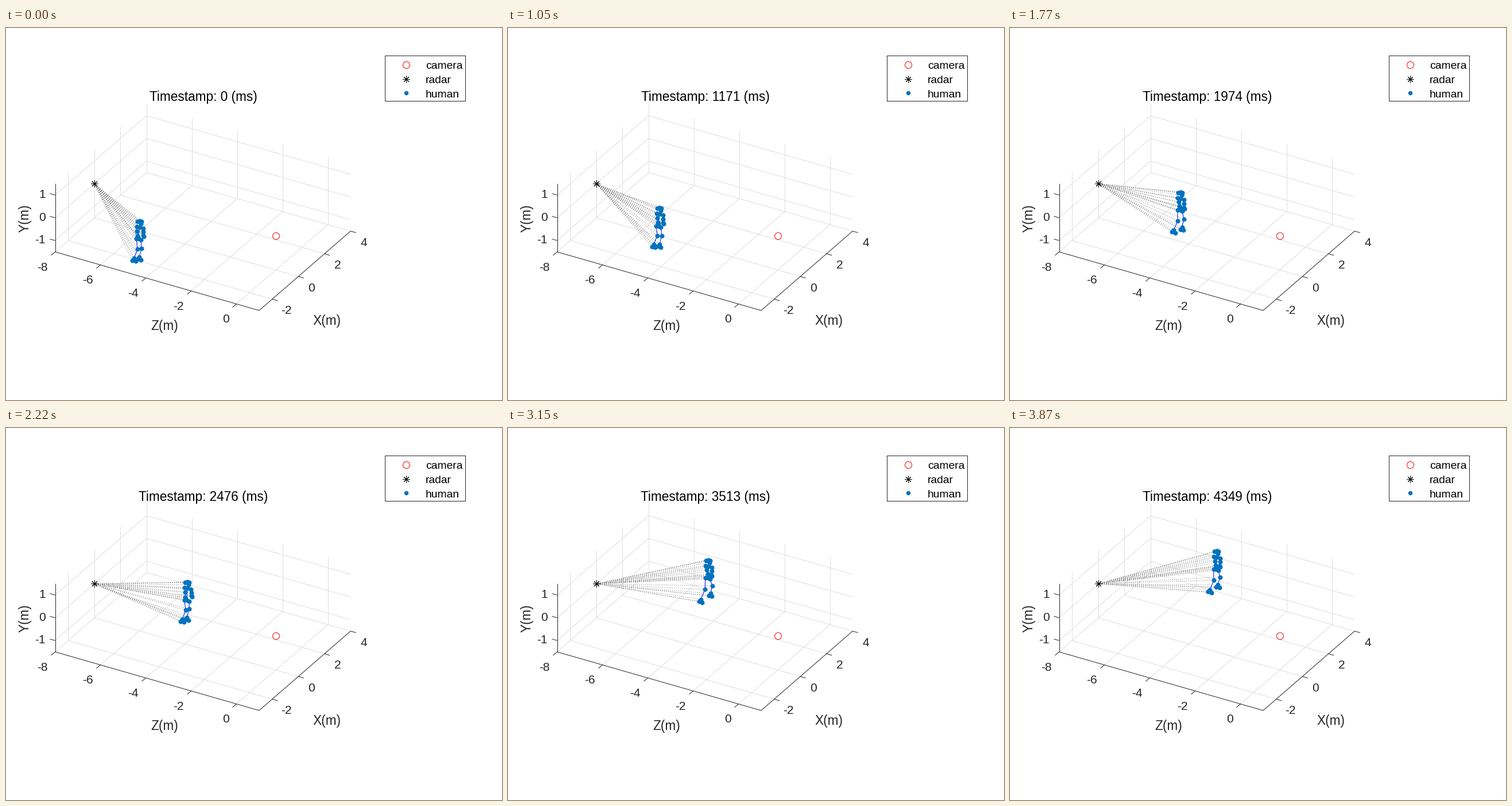
A matplotlib script that plays this animation: 864 px wide and 648 px high, repeating every 3.9 s.

```python
import numpy as np
import matplotlib
import matplotlib.pyplot as plt
from matplotlib.animation import FuncAnimation
from matplotlib.collections import LineCollection

matplotlib.rcParams["font.family"] = "Liberation Sans"
W, H, FRAMES, STEP = 864, 648, 130, 30
INK, GRID, BLUE = "#262626", "#dedede", "#0072bd"
TICK, LABEL, SMALL = 21, 22.6, 19.2

fig = plt.figure(figsize=(W / 72, H / 72), dpi=72, facecolor="white")
ax = fig.add_axes([0, 0, 1, 1])
ax.set_xlim(0, W)
ax.set_ylim(H, 0)
ax.axis("off")

# ---- axes box, oblique projection ----
EX, EY, EZ = np.array([[22.75, -19.75], [0, -39.6], [39.5, 11.34]])
CORNER = np.array([85.5, 390])


def project(x, y, z):
    return CORNER + EX * (x + 3) + EY * (y + 1.5) + EZ * (z + 8)


def segments(pairs, color, z, **kw):
    lines = LineCollection(pairs, colors=color, linewidths=1, zorder=z, **kw)
    ax.add_collection(lines)
    return lines


def label(x, y, s, size=TICK, ha="center", color=INK):
    return ax.text(x, y + 0.36 * size, s, size=size, ha=ha, va="baseline",
                   color=color, zorder=9)


XT, YT, ZT = range(-2, 5, 2), range(-1, 2), range(-8, 1, 2)
grid = []
for x in XT:
    grid += [(project(x, -1.5, -8), project(x, -1.5, 1)),
             (project(x, -1.5, -8), project(x, 1.5, -8))]
for z in ZT:
    grid += [(project(-3, -1.5, z), project(4, -1.5, z)),
             (project(4, -1.5, z), project(4, 1.5, z))]
for y in YT:
    grid += [(project(-3, y, -8), project(4, y, -8)),
             (project(4, y, -8), project(4, y, 1))]
segments(grid, GRID, 1)

front = project(-3, -1.5, 1)
rules = [(CORNER, front), (front, project(4, -1.5, 1)),
         (CORNER, project(-3, 1.5, -8))]
for x in XT:
    p = project(x, -1.5, 1)
    rules.append((p, p + (9.5, 2.7)))
    label(p[0] + (25 if x < 0 else 23), p[1] + 18.5, str(x))
for z in ZT:
    p = project(-3, -1.5, z)
    rules.append((p, p + (-7, 6)))
    label(p[0] - (22 if z < 0 else 18.5), p[1] + 25, str(z))
for y in YT:
    p = project(-3, y, -8)
    rules.append((p, p + (-9, -2.6)))
    label(69, p[1] - 2.5, str(y), ha="right")
segments(rules, INK, 2)

label(276.5, 517.5, "Z(m)", LABEL)
label(558.5, 509, "X(m)", LABEL)
ax.text(32.5, 331, "Y(m)", size=LABEL, rotation=90, ha="center", va="center",
        color=INK)
title = label(343.5, 118.5, "", LABEL, color="black")


# ---- fixed markers and legend ----
def ring(x, y):
    ax.plot(x, y, "o", ms=12, mfc="none", mec="red", mew=1, zorder=6)


def star(x, y):
    ax.plot(x, y, marker=(8, 2, 0), ms=12, mec="black", mew=1, zorder=6)


RADAR = project(0, 0, -8)
ring(*project(0, 0, 0))
star(*RADAR)

ax.add_patch(plt.Rectangle((659.5, 47.5), 140, 79, fc="white", ec=INK, lw=1))
ring(696.5, 64)
star(696.5, 88.5)
ax.plot(696.5, 113, "o", ms=7.5, color=BLUE, mew=0, zorder=6)
for row, name in enumerate(("camera", "radar", "human")):
    label(731, 64.5 + 25 * row, name, SMALL, ha="left", color="black")

# ---- walking figure: offsets in pixels from the pelvis ----
SPEED, START, BRAKE, STRIDE = 0.059, 30, 104, 26
# joint: (centre, half the left-right spread, fore-aft swing in metres)
LIMBS = {
    "shoulder": ((2, -20), (5.5, 1.5), 0),
    "wrist": ((3, -5.5), (5, -0.5), -0.1),
    "hip": ((0, 1), (4, 1), 0),
    "knee": ((1.5, 17.5), (3.5, -0.5), 0.14),
    "ankle": ((-3.5, 33), (4.5, -1), 0.2),
}
HEAD, NECK = np.array([2.5, -29.5]), np.array([1.5, -20.5])
FACE = ((-5, -1), (-1, -2), (2, -1), (1, 3))


def pelvis(n):
    """Speed up, walk on steadily along a slight curve, slow to a halt."""
    n = float(n)
    run = n * n / (2 * START) if n < START else n - START / 2
    run -= max(0, n - BRAKE) ** 2 / (2 * (FRAMES - BRAKE))
    x = SPEED * run
    return np.array([231, 367]) + EX * x + EZ * (0.13 * x - 0.028 * x * x)


def limb(name, side, n):
    """Offset of a joint; side is -1 or 1, the two legs half a cycle apart."""
    centre, spread, swing = LIMBS[name]
    phase = 2 * np.pi * (n - 107) / STRIDE
    amount = min(n / 12, 1) * swing
    fore = side * amount * np.cos(phase)
    lift = 12 * abs(amount) * max(0, -side * np.sin(phase))
    return np.array(centre) + side * np.array(spread) + fore * EX - (0, lift)


def pose(n):
    """Joint positions and bones of the figure at step n."""
    base = pelvis(n)
    neck = base + NECK
    face = [base + HEAD + d for d in FACE]
    joints = [neck, base] + face
    bones = [(neck, base), (neck, face[-1])]
    for side in (-1, 1):
        shoulder, wrist, hip, knee, ankle = (
            base + limb(name, side, n) for name in LIMBS)
        elbow = (shoulder + wrist) / 2
        hand, heel, toe = wrist + (1, 2), ankle + (-3, 3.5), ankle + (2.5, 5)
        for chain in ([neck, shoulder, elbow, wrist, hand],
                      [base, hip, knee, ankle, heel], [ankle, toe]):
            joints += chain[1:]
            bones += zip(chain, chain[1:])
    return joints, bones


rays = segments([], "#707070", 3, linestyles=[(0, (1, 2.4))])
limbs = segments([], "#0000ff", 4)
dots, = ax.plot([], [], "o", ms=8, color=BLUE, mew=0, zorder=5)


def draw(n):
    # one sample is dropped late in the recording
    stamp = round((n + (n >= 117)) * 33.4568)
    title.set_text(f"Timestamp: {stamp} (ms)")
    joints, bones = pose(n)
    rays.set_segments([(RADAR, j) for j in joints])
    limbs.set_segments(bones)
    dots.set_data(*np.transpose(joints))
    return rays, limbs, dots, title


anim = FuncAnimation(fig, draw, frames=FRAMES, interval=STEP, repeat=True,
                     repeat_delay=0, blit=False)
plt.show()
```
